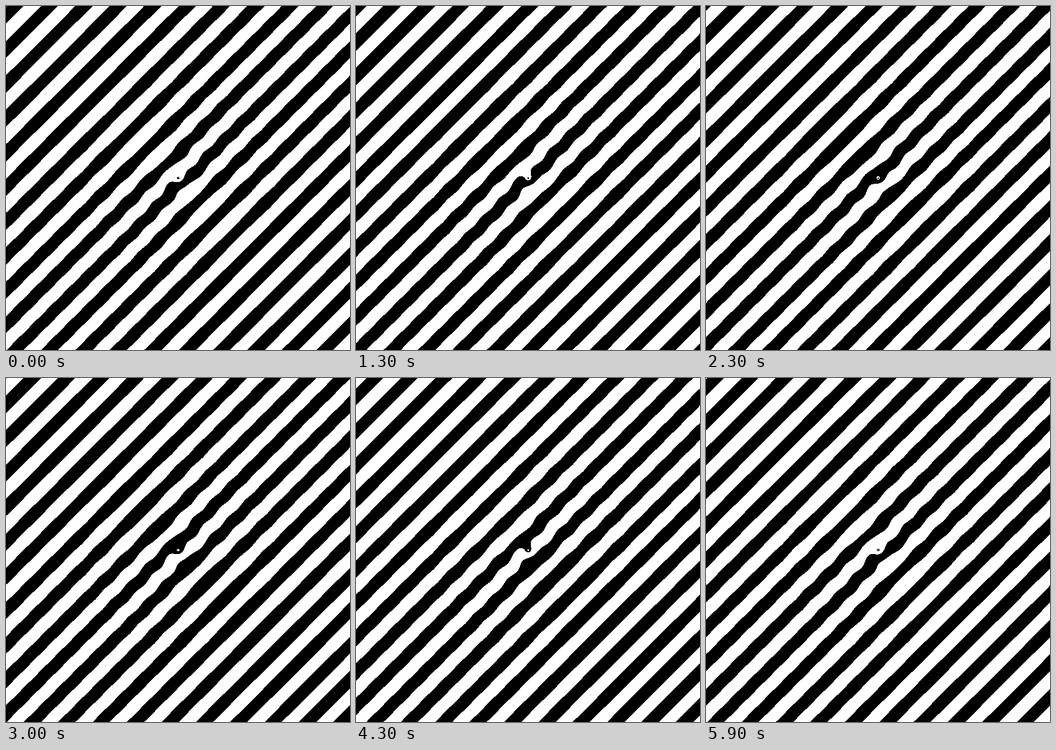
These frames come from a looping animation (600x600 px, 6 s). An HTML page with a canvas:

```html
<!DOCTYPE html>
<html lang="en">
<head>
<meta charset="utf-8">
<title>Drifting stripes</title>
<style>
  html, body { margin: 0; width: 100%; height: 100%; overflow: hidden; background: #fff; }
  canvas { display: block; width: 600px; height: 600px; }
</style>
</head>
<body>
<canvas id="stage" width="600" height="600"></canvas>
<script>
const SIZE = 600, HALF = SIZE / 2, BAND = 30, STEPS = 60, STEP_MS = 100;
const BLACK = 0xff000000, WHITE = 0xffffffff;

const ctx = document.getElementById('stage').getContext('2d');
const image = ctx.createImageData(SIZE, SIZE);
const pixels = new Uint32Array(image.data.buffer);
const phase = new Float32Array(SIZE * SIZE);

// Diagonal phase, twisted and pulled in at the centre, with a fading ripple.
function phaseAt(dx, dy) {
  const r = Math.max(Math.hypot(dx, dy), 0.5);
  const twist = 0.75 * Math.exp(-r / 15);
  const along = Math.SQRT2 * r * Math.cos(Math.atan2(dy, dx) - twist - Math.PI / 4);
  const pull = 55 / r * Math.exp(-r / 18);
  const ripple = -200 / (r + 25) * Math.cos(2 * Math.PI * (r - 21) / 42);
  return SIZE + along - pull - ripple;
}

for (let y = 0, i = 0; y < SIZE; y++) {
  for (let x = 0; x < SIZE; x++) phase[i++] = phaseAt(x - HALF, y - HALF);
}

function draw(step) {
  for (let i = 0; i < pixels.length; i++) {
    pixels[i] = Math.floor((phase[i] + step) / BAND) & 1 ? WHITE : BLACK;
  }
  ctx.putImageData(image, 0, 0);
}

const start = performance.now();
let shown = -1;

function tick() {
  const step = Math.floor((performance.now() - start) / STEP_MS) % STEPS;
  if (step !== shown) draw(shown = step);
  requestAnimationFrame(tick);
}
tick();
</script>
</body>
</html>
```
